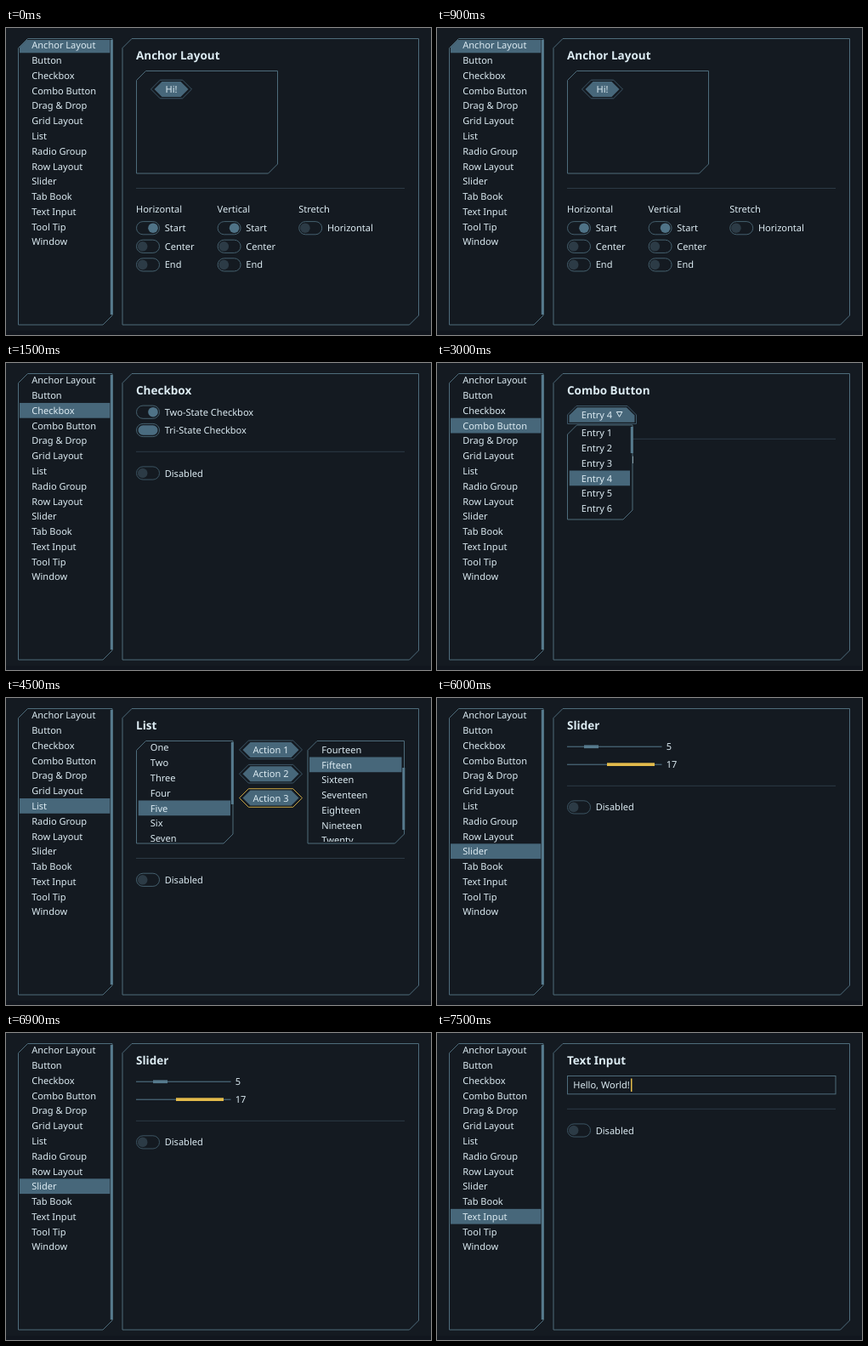
Recreate the animation shown at these times as an HTML page. Size 500 by 361 pixels, loop 8 s.

```html
<!DOCTYPE html>
<html lang="en">
<head>
<meta charset="utf-8">
<title>Widget gallery</title>
<style>
  html, body { margin: 0; width: 100%; height: 100%; overflow: hidden; background: #141a21; }
  svg { display: block; }
  text { font: 11.05px "Noto Sans", sans-serif; fill: #dcebf2; white-space: pre; text-rendering: geometricPrecision; }
  .title { font-size: 13.5px; font-weight: 700; }
  .mid { text-anchor: middle; }
  .frame { fill: #141a21; stroke: #4e6c7b; }
  .rule { stroke: #2c3a45; }
  .fill { fill: #47677a; }
  .bar { fill: #567a8d; }
  .rim { fill: #141a21; stroke: #3d5666; }
  .pill { fill: #141a21; stroke: #45606e; }
  .disabled .pill { stroke: #3c5563; }
  .knob { fill: #2c3b46; }
  .on .knob { fill: #4f7387; }
  .mixed .knob { fill: #4a6c80; }
  .gold { fill: #e3bb4b; }
  .focus .rim { stroke: #c9a543; }
  .scene { visibility: hidden; animation: show 8s step-end infinite; }
  .scene.last { animation-name: show-last; }
  @keyframes show { 0% { visibility: visible; } 18.75%, 100% { visibility: hidden; } }
  @keyframes show-last { 0% { visibility: visible; } 6.25%, 100% { visibility: hidden; } }
</style>
</head>
<body>
<script>
const ROW = 17.77;
const CUT = 11;
let clipCount = 0;

const text = (x, y, label, cls = "") => `<text x="${x}" y="${y}" class="${cls}">${label}</text>`;
const rect = (x, y, w, h, cls) => `<rect x="${x}" y="${y}" width="${w}" height="${h}" class="${cls}"/>`;
const line = (x1, x2, y, cls = "rule") => `<path d="M${x1} ${y}H${x2}" class="${cls}"/>`;
const title = label => text(153, 37, label, "title");

// Box with its top-left and bottom-right corners cut off.
const cutPath = (l, t, r, b, c = CUT) =>
  `M${l} ${t + c}L${l + c} ${t}H${r}V${b - c}L${r - c} ${b}H${l}Z`;
const panel = (l, t, r, b, c) => `<path d="${cutPath(l, t, r, b, c)}" class="frame"/>`;

const hexPath = (cx, cy, w, h) =>
  `M${cx - w} ${cy}l${h} ${-h}H${cx + w - h}l${h} ${h}l${-h} ${h}H${cx - w + h}Z`;

function button(cx, cy, w, label, cls = "") {
  return `<g class="${cls}"><path d="${hexPath(cx, cy, w, 10.8)}" class="rim"/>
    <path d="${hexPath(cx, cy, w - 4, 9)}" class="fill"/></g>` +
    text(cx, cy + 4, label, "mid");
}

function toggle(x, cy, label, state = "off") {
  const knob = state === "mixed"
    ? `<rect x="${x + 2.5}" y="${cy - 5.7}" width="23" height="11.4" rx="5.7" class="knob"/>`
    : `<circle cx="${x + (state === "on" ? 20 : 7.7)}" cy="${cy}" r="5.8" class="knob"/>`;
  return `<g class="${state}"><rect x="${x + .5}" y="${cy - 7.6}" width="27" height="15.2" rx="7.6" class="pill"/>${knob}</g>` +
    text(x + 33.7, cy + 4, label);
}

// first: vertical middle of the first row; thumb: [top, bottom] of the scrollbar
function list({ l, t, r, b, first, rows, selected, thumb, indent = 16.3 }) {
  const id = `clip${clipCount++}`;
  const mark = selected < 0 ? "" : rect(l + 2, first - 9 + ROW * selected, r - l - 5, ROW, "fill");
  const labels = rows.map((label, i) => text(l + indent, +(first + 4 + ROW * i).toFixed(1), label)).join("");
  return panel(l, t, r, b) +
    `<clipPath id="${id}"><path d="${cutPath(l + 2, t + 1.5, r - 1, b - 2, CUT - 1)}"/></clipPath>
     <g clip-path="url(#${id})">${mark}${labels}</g>` +
    rect(r - 2.2, thumb[0], 3, thumb[1] - thumb[0], "bar");
}

const pages = ["Anchor Layout", "Button", "Checkbox", "Combo Button", "Drag &amp; Drop", "Grid Layout", "List",
  "Radio Group", "Row Layout", "Slider", "Tab Book", "Text Input", "Tool Tip", "Window"];

const menu = list({ l: 14.5, t: 12.5, r: 125, b: 349, first: 20.3, rows: pages, selected: -1, thumb: [14, 337], indent: 15.7 });

function menuMark(i) {
  const top = 11.4 + ROW * i;
  return i ? rect(16, top, 106.3, ROW, "fill")
    : `<path d="M16 22.5L24.5 14H122.3V${top + ROW}H16Z" class="fill"/>` ;
}

const group = (x, heading, options) => text(x, 217.3, heading) +
  options.map((label, i) => toggle(x, 235.2 + 21.6 * i, label, i || options.length < 2 ? "off" : "on")).join("");

const choices = ["Start", "Center", "End"];

const scenes = [
  [0, panel(153.5, 50.5, 319.5, 171) + button(194.5, 72, 24, "Hi!") + line(153, 469, 188.5) +
    group(153, "Horizontal", choices) + group(248.6, "Vertical", choices) + group(344.2, "Stretch", ["Horizontal"])],

  [2, toggle(153, 57.7, "Two-State Checkbox", "on") + toggle(153, 79, "Tri-State Checkbox", "mixed") +
    line(153, 469, 104.3) + toggle(153, 129.5, "Disabled", "disabled")],

  [3, line(153, 469, 89.3) + toggle(153, 114.3, "Disabled") +
    `<path d="M153.5 61L164 50.5H224L234.5 61V71.5H153.5Z" class="rim"/>
     <path d="M155.5 61.5L165 52.3H223L232.5 61.5V69.7H155.5Z" class="fill"/>` +
    text(169.8, 64.5, "Entry 4") +
    `<path d="M211.3 57.5H217.9L214.6 63.3Z" fill="none" stroke="#dcebf2"/>` +
    list({ l: 153.5, t: 73, r: 230, b: 184, first: 82.2, rows: [1, 2, 3, 4, 5, 6].map(n => `Entry ${n}`),
      selected: 3, thumb: [75, 106] })],

  [6, list({ l: 153.5, t: 50.5, r: 267, b: 171, first: 58.4, selected: 4, thumb: [52, 125],
      rows: ["One", "Two", "Three", "Four", "Five", "Six", "Seven"] }) +
    [1, 2, 3].map(n => button(311.5, 32.6 + 28.3 * n, 37, `Action ${n}`, n === 3 ? "focus" : "")).join("") +
    list({ l: 355, t: 50.5, r: 468.5, b: 171, first: 60.7, selected: 1, thumb: [82, 155],
      rows: ["Fourteen", "Fifteen", "Sixteen", "Seventeen", "Eighteen", "Nineteen", "Twenty"] }) +
    line(153, 469, 188.5) + toggle(153, 213.8, "Disabled")],

  [9, rect(153, 56.7, 111.5, 1, "bar") + rect(173, 55.4, 17, 3.7, "bar") + text(269.8, 61.2, "5") +
    rect(153, 77.7, 111.5, 1, "bar") + rect(200, 76.3, 56, 3.7, "gold") + text(269.8, 82.2, "17") +
    line(153, 469, 103.3) + toggle(153, 128.4, "Disabled", "disabled")],

  [11, `<rect x="153.5" y="50.5" width="315.5" height="21.3" class="frame"/>` + text(160.3, 65, "Hello, World!") +
    rect(228, 53.5, 1.5, 15.5, "gold") + line(153, 469, 89.3) + toggle(153, 114.5, "Disabled", "disabled")]
];

const drawScene = ([page, body], i) =>
  `<g class="scene${i === scenes.length - 1 ? " last" : ""}" style="animation-delay:${i * 1.5 - 8}s">
    ${title(pages[page])}${body}</g>`;
const drawMark = ([page], i) =>
  `<g class="scene${i === scenes.length - 1 ? " last" : ""}" style="animation-delay:${i * 1.5 - 8}s">
    ${menuMark(page)}${text(30.2, +(24.3 + ROW * page).toFixed(1), pages[page])}</g>`;

document.body.innerHTML = `<svg width="500" height="361" viewBox="0 0 500 361">
  <rect width="500" height="361" fill="#141a21"/>
  <rect y="356" width="500" height="5" fill="#11161e"/>
  ${menu}${panel(137, 12.5, 485.5, 349)}
  ${scenes.map(drawMark).join("")}${scenes.map(drawScene).join("")}
</svg>`;
</script>
</body>
</html>
```
